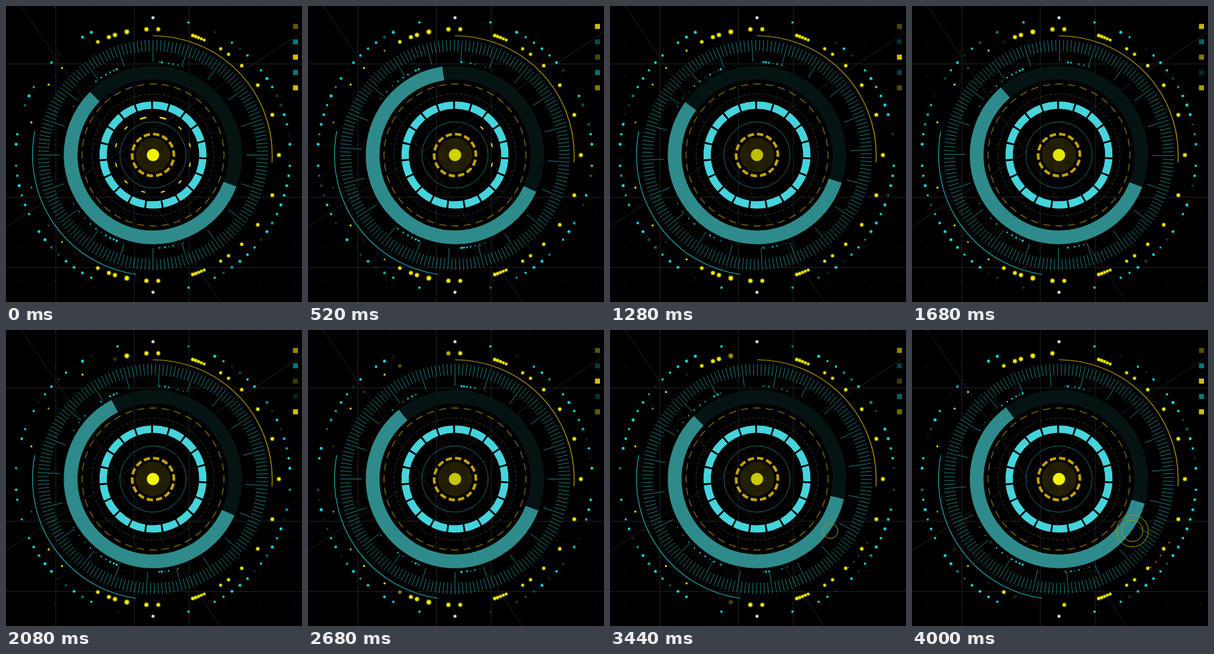
These frames come from a looping animation (442 px wide and 442 px high, 4040 ms). An HTML page with a canvas:

```html
<!DOCTYPE html>
<html lang="en">
<head>
<meta charset="utf-8">
<title>Radar dial</title>
<style>
html, body { margin: 0; width: 100%; height: 100%; overflow: hidden; background: #000; }
canvas { display: block; width: 442px; height: 442px; }
</style>
</head>
<body>
<canvas id="stage" width="442" height="442"></canvas>
<script>
const g = document.getElementById('stage').getContext('2d');
const LOOP = 4040, CX = 219.5, CY = 222.5, TAU = Math.PI * 2, DEG = Math.PI / 180;
const YELLOW = '#f7ee00', TEAL = '#10e6ee';

// Key poses of the big arc: time, swing of its start, angle of its end.
const POSES = [
  [0, 0, 225], [520, 3.6, 261.8], [1280, -2.6, 216.4], [2080, 3.3, 242.3],
  [2680, 0, 231], [3440, -7.8, 225], [4000, -4.8, 233.5]
];

function pose(t) {
  const next = POSES.findIndex(p => p[0] > t);
  if (next < 0) return POSES[POSES.length - 1];
  const a = POSES[next - 1], b = POSES[next];
  const u = (t - a[0]) / (b[0] - a[0]), eased = u * u * (3 - 2 * u);
  return a.map((v, i) => v + (b[i] - v) * eased);
}

const clamp = v => Math.max(0, Math.min(1, v));
const wave = (t, cycles, peak) => Math.cos(TAU * cycles * (t - peak) / LOOP);

let seed = 11;
const random = () => (seed = seed * 16807 % 2147483647) / 2147483647;

// Brightness rules, each a function of time.
const steady = () => 1;
const dip = center => t => clamp((Math.abs(t - center) - 450) / 250);
function twinkle() {
  const cycles = 1 + Math.floor(random() * 3), peak = random() * LOOP;
  return t => clamp(.95 + .95 * wave(t, cycles, peak));
}

const beads = [];
function bead(angle, radius, r, color, level) {
  const x = CX + Math.cos(angle * DEG) * radius;
  const y = CY + Math.sin(angle * DEG) * radius;
  beads.push({ x, y, r, color, level });
}

function yellowBeads() {
  for (const side of [-1, 1]) {
    for (let i = side < 0 ? 1 : 0; i < 6; i++)
      bead(side * (20.4 * i - 1.78 * i * i), 188, 2.6 - i * .1, YELLOW, steady);
    for (let i = 0; i < 5; i++)
      bead(side * (66 + i * 1.4), 188, 1.9 + i * .12, YELLOW, steady);
    for (const a of [87.6, 93, 102, 107.6, 110.5, 116])
      bead(side * a, 188, 3.2 - Math.abs(a - 100) * .05, YELLOW,
        dip((side < 0 ? 3600 : 4700) - 50 * (a - 87)));
    for (const a of [124, 136.3, 146, 165])
      bead(side * a, 188, 1.3, YELLOW, twinkle());
  }
}

function tealBeads() {
  for (let i = 0; i < 15; i++) {
    const a = 4.5 + 4.2 * i;
    for (const angle of [a, -a, 180 - a, 180 + a])
      bead(angle, 205, 1.4 + random() * .6, TEAL, twinkle());
  }
  for (const angle of [75, -75, 105, -105]) bead(angle, 205, 1.6, TEAL, twinkle());
  for (const side of [-1, 1]) {
    bead(side * 90, 205, 2, '#d8ffff', steady);
    for (let i = 0; i < 7; i++)
      bead(side * (86 - i * (1.3 + .2 * i)), 139, 1.4 - i * .12, TEAL, twinkle());
    for (let i = 0; i < 10; i++)
      bead(side * (113 + 1.7 * i + .25 * i * i), 139, 1.4 - i * .08, TEAL, twinkle());
  }
}

function sparks() {
  for (let i = 0; i < 5; i++)
    bead(30 + i * 3.5, 190, 1, '#e06a10', t => clamp((t - 2900) / 900));
}

function disc(x, y, r, color) {
  g.fillStyle = color;
  g.beginPath();
  g.arc(x, y, r, 0, TAU);
  g.fill();
}

function ring(r, width, color, from = 0, to = 360, x = CX, y = CY) {
  g.strokeStyle = color;
  g.lineWidth = width;
  g.beginPath();
  g.arc(x, y, r, from * DEG, to * DEG);
  g.stroke();
}

function dashes(r, width, color, count, share, offset = -90) {
  const step = 360 / count;
  for (let i = 0; i < count; i++)
    ring(r, width, color, offset + i * step, offset + (i + share) * step);
}

function line(x1, y1, x2, y2) {
  g.beginPath();
  g.moveTo(x1, y1);
  g.lineTo(x2, y2);
  g.stroke();
}

function backdrop() {
  g.fillStyle = '#000';
  g.fillRect(0, 0, 442, 442);
  g.strokeStyle = '#1d1f20';
  g.lineWidth = 1;
  for (const x of [74.5, 191.5, 273.5]) line(x, 0, x, 442);
  for (const y of [86.5, 285.5, 390.5]) line(0, y, 442, y);
  line(23, 0, 320, 442);
  line(442, 39, 0, 330);
  g.fillStyle = '#343a3a';
  for (let x = 22; x < 442; x += 51)
    for (let y = 2; y < 442; y += 51) g.fillRect(x, y, 1, 1);
}

function ticks(swing) {
  g.strokeStyle = '#18777c';
  g.lineWidth = 1;
  for (let i = 0; i < 180; i++) {
    const a = (i * 2 + swing) * DEG, c = Math.cos(a), s = Math.sin(a);
    const inner = i % 9 ? 155 : 139;
    line(CX + c * inner, CY + s * inner, CX + c * 172, CY + s * 172);
  }
}

function core(t) {
  disc(CX, CY, 25, '#141200');
  for (let r = 11; r < 26; r += 2) ring(r, .9, '#393300');
  const v = 212 + 33 * wave(t, 2, 0);
  disc(CX, CY, 9.3, `rgb(${v},${v},0)`);
}

function fadingDashes(t) {
  for (let i = 0; i < 12; i++) {
    const a = i * 30 - 105, top = i < 2, late = i > 1 && i < 5;
    const half = top ? 5 : 3;
    g.globalAlpha = clamp(((late ? 900 : 420) - t) / 300);
    ring(57, top ? 2.4 : 1.8, '#eee000', a - half, a + half);
  }
  g.globalAlpha = 1;
}

function drawBeads(t) {
  for (const { x, y, r, color, level } of beads) {
    const alpha = level(t);
    g.globalAlpha = alpha * .25;
    disc(x, y, r * 1.5, color);
    g.globalAlpha = alpha;
    disc(x, y, r, color);
  }
  g.globalAlpha = 1;
}

function drawSquares(t) {
  [[3, 450], [2, 0], [3, 0], [1, 100], [2, 0]].forEach(([cycles, peak], i) => {
    g.globalAlpha = .6 + .34 * wave(t, cycles, peak);
    g.fillStyle = i % 2 ? '#087f88' : '#e0cc00';
    g.fillRect(428.5, 26.8 + i * 22.9, 7.5, 7.5);
  });
  g.globalAlpha = 1;
}

function ripples(t) {
  for (const start of [3280, 3680])
    if (t > start) ring(.89 * Math.sqrt(t - start), 1, '#a39a00', 0, 360, 329, 300);
}

function draw(t) {
  const [, swing, arcEnd] = pose(t);
  backdrop();
  ticks(swing);
  ring(123, 20.5, '#051313');
  ring(123, 20.5, '#2f8b8b', 20.8 + swing, arcEnd);
  ring(178, 1.2, '#b89b00', -90, 3.5);
  ring(180, 1.2, '#18a6ae', 98, 191.4);
  dashes(106, 1.3, '#806c00', 36, .6, -93);
  dashes(91, .8, '#3b4343', 80, .6);
  dashes(74.5, 11, '#45d4dc', 19, .89);
  ring(49.5, 1, '#14666b');
  dashes(31.2, 4, '#c6a300', 14, .68);
  core(t);
  fadingDashes(t);
  drawBeads(t);
  drawSquares(t);
  ripples(t);
}

yellowBeads();
tealBeads();
sparks();

const begin = performance.now();
function frame() {
  const t = Math.max(0, performance.now() - begin) % LOOP;
  draw(Math.floor(t / 40) * 40);
  requestAnimationFrame(frame);
}
frame();
</script>
</body>
</html>
```
